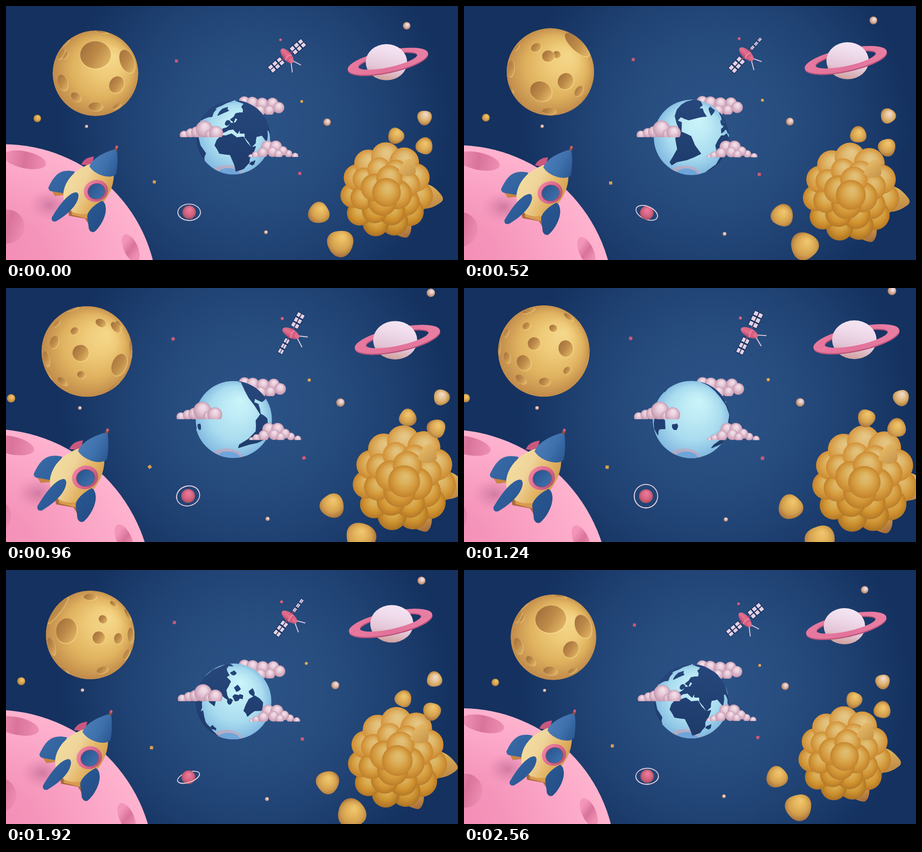
Animation, 960 px wide and 540 px high, one loop 2.6 s. Source, as an HTML page with a canvas:

```html
<!DOCTYPE html>
<html lang="en">
<head>
<meta charset="utf-8">
<title>Space</title>
<style>
html, body { margin: 0; width: 100%; height: 100%; overflow: hidden; background: #14315f; }
canvas { display: block; }
</style>
</head>
<body>
<canvas id="stage" width="960" height="540"></canvas>
<script>
const ctx = document.getElementById('stage').getContext('2d');
const LOOP = 2600, TAU = Math.PI * 2, RAD = Math.PI / 180;
const { sin, cos, hypot, atan2, sqrt } = Math;
let turn = 0, zoom = 0;

const mix = (a, b, k = zoom) => a + (b - a) * k;

// ---------- drawing helpers ----------
function place(x0, y0, x1, y1, s0, s1, draw) {
  ctx.save();
  ctx.translate(mix(x0, x1), mix(y0, y1));
  const s = mix(s0, s1);
  ctx.scale(s, s);
  draw();
  ctx.restore();
}
function stops(gradient, colors) {
  colors.forEach((c, i) => gradient.addColorStop(i / (colors.length - 1), c));
  return gradient;
}
const linear = (x0, y0, x1, y1, ...colors) => stops(ctx.createLinearGradient(x0, y0, x1, y1), colors);
const radial = (x, y, r, dx, dy, ...colors) =>
  stops(ctx.createRadialGradient(x + dx * r, y + dy * r, 0, x, y, r * 1.05), colors);

function ellipse(x, y, rx, ry, rot, fill) {
  ctx.beginPath();
  ctx.ellipse(x, y, rx, ry, rot, 0, TAU);
  ctx.fillStyle = fill;
  ctx.fill();
}
const ball = (x, y, r, colors, dx = 0.3, dy = -0.4) =>
  ellipse(x, y, r, r, 0, radial(x, y, r, dx, dy, ...colors));
function shape(d, fill) {
  ctx.fillStyle = fill;
  ctx.fill(new Path2D(d));
}
function line(x0, y0, x1, y1, width, color) {
  ctx.beginPath();
  ctx.moveTo(x0, y0);
  ctx.lineTo(x1, y1);
  ctx.lineWidth = width;
  ctx.strokeStyle = color;
  ctx.stroke();
}
function clipDisc() {
  ctx.beginPath();
  ctx.arc(0, 0, 1, 0, TAU);
  ctx.clip();
}

// ---------- sphere maths: x right, y up, z to the viewer ----------
function spin([x, y, z], [a, b, c], angle) {
  const co = cos(angle), si = sin(angle), k = (a * x + b * y + c * z) * (1 - co);
  return [x * co + (b * z - c * y) * si + a * k,
          y * co + (c * x - a * z) * si + b * k,
          z * co + (a * y - b * x) * si + c * k];
}

// ---------- yellow moon ----------
const MOON_AXIS = [-0.084, 0.958, 0.28];
// Craters as x, y, radius on the disc, seen at the given turn.
const facing = (at, ...spots) => spots.map(([x, y, r]) =>
  ({ r, at: spin([x, y, sqrt(1 - x * x - y * y)], MOON_AXIS, -at * TAU) }));
const craters = [
  facing(0, [0, .46, .36], [.5, -.27, .2], [-.71, .42, .09], [-.78, -.22, .19], [-.46, -.56, .13],
    [0, -.79, .16], [.5, -.77, .11]),
  facing(.26, [-.1, .56, .12], [.24, .4, .14], [-.66, .5, .09], [-.72, 0, .18], [.14, -.43, .25],
    [-.7, -.47, .09], [.22, -.88, .16]),
  facing(.48, [-.37, .54, .09], [-.2, .16, .14], [-.82, .39, .1], [-.8, -.15, .12], [-.43, -.26, .17],
    [-.49, -.62, .13], [.03, -.67, .12]),
  facing(.74, [-.55, .1, .28], [.2, -.06, .14], [0, .86, .14], [.28, -.79, .13]),
].flat();

function moon() {
  clipDisc();
  ball(0, 0, 1, ['#f5d88c', '#efcb79', '#dfb25f', '#bd8648'], .45, -.4);
  for (const { at, r } of craters) {
    const [x, y, z] = spin(at, MOON_AXIS, turn * TAU), k = sqrt(1 - r * r);
    if (z < .02) continue;
    const cx = x * k, cy = -y * k, rot = atan2(-y, x);
    ellipse(cx + .012, cy + .012, r * z * 1.06, r * 1.06, rot, 'rgba(250,220,145,.45)');
    ellipse(cx, cy, r * z, r, rot, linear(cx - r, cy - r * .6, cx + r, cy + r * .7, '#a06c3c', '#be8b48', '#e6bd6b'));
  }
}

// ---------- earth: rough coastlines as lon, lat pairs ----------
let seed = 7;
const random = () => (seed = seed * 16807 % 2147483647) / 2147483647;

function globePoint(lonDeg, latDeg) {
  const tilt = 32 * RAD, lon = (lonDeg - 14) * RAD, lat = latDeg * RAD, front = cos(lat) * cos(lon);
  return [cos(lat) * sin(lon), sin(lat) * cos(tilt) - front * sin(tilt), sin(lat) * sin(tilt) + front * cos(tilt)];
}
// Each edge gets one jittered midpoint, so a few points give a ragged coast.
function coast(...c) {
  const points = [];
  for (let i = 0; i < c.length; i += 2) {
    const [x, y, u, v] = [0, 1, 2, 3].map(j => c[(i + j) % c.length]), bend = (random() - .5) * .24;
    points.push(globePoint(x, y), globePoint((x + u) / 2 + (v - y) * bend, (y + v) / 2 - (u - x) * bend * .4));
  }
  return points;
}
const island = (lon, lat, r) => Array.from({ length: 8 }, (_, i) => {
  const a = i * TAU / 8, q = r * (.7 + .6 * random());
  return globePoint(lon + q * cos(a) / cos(lat * RAD), lat + q * sin(a));
});
const africa = coast(-17,15, -9,32, 10,37, 20,31, 32,31, 43,12, 51,11, 40,-5, 40,-15, 32,-28, 19,-34, 9,4, -8,4);
const eurasia = coast(-9,37, -9,43, -1,46, 8,54, 20,55, 28,60, 20,64, 14,56, 5,60, 25,71, 60,69, 100,77, 185,67,
  158,52, 155,59, 137,54, 127,38, 120,38, 121,27, 107,19, 103,2, 97,17, 90,22, 78,8, 70,23, 57,26, 52,17,
  44,13, 35,30, 36,37, 27,38, 30,46, 22,38, 13,45, 3,43);
const northAmerica = coast(-166,65, -156,71, -95,70, -85,57, -78,62, -56,52, -70,42, -81,30, -97,27, -96,18,
  -88,20, -79,8, -106,22, -124,42, -140,60);
const southAmerica = coast(-78,8, -62,10, -35,-6, -48,-26, -68,-54, -74,-50, -70,-18, -81,-5);
const greenland = coast(-55,80, -20,76, -43,60, -58,72);
const australia = coast(114,-23, 130,-12, 142,-12, 153,-27, 147,-38, 131,-32, 115,-34);
const islands = [[140,-5,5], [114,1,4.5], [102,0,4], [121,-2,3], [123,12,4], [138,37,4], [172,-41,4.5],
  [47,-19,4], [-2,54,3.5]].map(i => island(...i));
const lands = [africa, eurasia, northAmerica, southAmerica, greenland, australia, ...islands];

function limbAngle(p, q) {
  const k = p[2] / (p[2] - q[2]);
  return atan2(-mix(p[1], q[1], k), mix(p[0], q[0], k));
}
// Adds the visible part of a coastline, following the limb where it is hidden.
function traceLand(points) {
  const first = points.findIndex(p => p[2] > 0), n = points.length;
  if (first < 0) return;
  let before = points[first], exit = 0;
  ctx.moveTo(before[0], -before[1]);
  for (let i = 1; i <= n; i++) {
    const p = points[(first + i) % n];
    if (p[2] > 0) {
      if (before[2] <= 0) {
        const entry = limbAngle(before, p);
        ctx.arc(0, 0, 1, exit, entry, (entry - exit + 2 * TAU) % TAU > Math.PI);
      }
      ctx.lineTo(p[0], -p[1]);
    } else if (before[2] > 0) {
      exit = limbAngle(before, p);
    }
    before = p;
  }
  ctx.closePath();
}
function earth() {
  clipDisc();
  ball(0, 0, 1, ['#cbf5fb', '#bdeaf5', '#a9dcef', '#7fb6df'], .2, -.5);
  ellipse(-.18, 1, .42, .25, 0, 'rgba(205,160,180,.6)');
  ellipse(-.14, 1.02, .32, .19, 0, '#6ea5da');
  ctx.fillStyle = ctx.strokeStyle = linear(0, -1, 0, 1, '#27477c', '#1d3a6a');
  ctx.lineWidth = .025;
  ctx.lineJoin = 'round';
  for (const land of lands) {
    ctx.beginPath();
    traceLand(land.map(p => spin(p, [0, 1, 0], turn * TAU)));
    ctx.fill();
    ctx.stroke();
  }
}

// ---------- clouds: x, y, radius above a flat base ----------
const backCloud = [[-37,-27,12], [-20,-25,13], [1,-23,13], [23,-24,12], [36,-15,12], [16,-9,11], [-4,-8,12]];
const leftCloud = [[-37,-5,9], [-23,-9,10], [-10,-11,12], [6,-17,18], [18,-6,10], [31,-9,15]];
const frontCloud = [[-47,-1,5], [-37,-4,8], [47,-2,7], [33,-7,8], [-12,-22,13], [6,-22,13], [-22,-9,11],
                    [21,-13,10], [-1,-11,11], [12,-6,9]];
function cloud(puffs) {
  ctx.beginPath();
  ctx.rect(-70, -50, 140, 50);
  ctx.clip();
  puffs.forEach(([x, y, r]) => ball(x, y, r, ['#f4e2ec', '#ecd3e0', '#d9b4c6', '#c193aa'], .1, -.5));
}

// ---------- satellite ----------
function panel(from, to, width) {
  const h = 10.5 * width, step = (to - from) / 3;
  ctx.fillStyle = '#1a3260';
  ctx.fillRect(from, -h, to - from, 2 * h);
  ctx.fillStyle = '#e4d2e4';
  for (let i = 0; i < 3; i++)
    for (const row of [-.85, .1]) ctx.fillRect(from + (i + .13) * step, row * h, step * .74, h * .75);
}
function satellite() {
  const a = turn * 2 * TAU;
  ctx.rotate(mix(-40, -64) * RAD);
  panel(13, 47, .65 + .3 * cos(a) - .2 * sin(a));
  panel(-48, -12, .8 + .28 * sin(a + .25));
  line(-14, 0, 14, 0, 3, '#8c4265');
  line(-3, 17, -14, 34, 2, '#dcc8de');
  line(3, 17, 10, 34, 2, '#dcc8de');
  ellipse(0, 0, 9, 19, 0, linear(-9, 0, 9, 0, '#b9496c', '#e4708f', '#d65f80'));
  ellipse(0, 4, 9, 3, 0, '#f08ca6');
  ellipse(0, 6, 8.5, 3, 0, '#d65f80');
}

// ---------- ringed planets ----------
function bigRing() {
  const a = turn * 2 * TAU;
  ctx.save();
  ctx.translate(.5 + 2.5 * cos(a) - 4 * sin(a), -2);
  ctx.rotate(-12 * RAD);
  const band = (y, fill) => {
    ctx.beginPath();
    ctx.ellipse(0, y, 87, 23, 0, 0, TAU);
    ctx.ellipse(0, y - 1, 64, 14, 0, 0, TAU, true);
    ctx.fillStyle = fill;
    ctx.fill();
  };
  band(2.5, '#b9557c');
  band(0, linear(-87, 0, 87, 0, '#e9799f', '#e27299', '#ea80a5'));
  ctx.restore();
}
function ringedPlanet() {
  bigRing();
  ellipse(0, 0, 44, 38.5, 0, linear(8, -39, -8, 39, '#f5e6f5', '#eed9e9', '#e3c6d8', '#cf9f98'));
  ctx.rotate(-12 * RAD);
  ctx.beginPath();
  ctx.rect(-110, 0, 220, 60);
  ctx.clip();
  ctx.rotate(12 * RAD);
  bigRing();
}

// Ring normals of the small planet: time, x, y, z.
const ringKeys = [[0, 0,.69,.72], [320, .9,-.18,.4], [680, -.27,-.86,.42], [1240, 0,0,1], [1600, -.38,.92,.06],
                  [1920, .3,.85,.43], [2600, 0,.69,.72]];
function tumblingPlanet() {
  const t = turn * LOOP, i = ringKeys.findIndex(k => k[0] > t), a = ringKeys[i - 1], b = ringKeys[i];
  const k = (t - a[0]) / (b[0] - a[0]);
  const [x, y, z] = [1, 2, 3].map(j => mix(a[j], b[j], k));
  const flat = Math.max(.03, Math.abs(z) / hypot(x, y, z)), rot = atan2(y, x) - Math.PI / 2;
  const ring = end => {
    ctx.beginPath();
    ctx.ellipse(0, 0, 24, 24 * flat, rot, 0, end);
    ctx.lineWidth = 1.8;
    ctx.strokeStyle = '#e5cddd';
    ctx.stroke();
  };
  ring(TAU);
  ball(0, 0, 14.3, ['#ee7d9b', '#e27091', '#d1627f', '#a54c5a'], .1, -.5);
  ring(Math.PI);
}

// ---------- pink planet and rocket ----------
function pinkPlanet() {
  ball(0, 0, 327, ['#f48db5', '#f594ba', '#fba5c6', '#ffb6d0'], -.1, -.3);
  const crater = (x, y, rx, ry, deg) => ellipse(x, y, rx, ry, deg * RAD,
    linear(x - rx, y - ry * .3, x + rx, y + ry * .4, '#f395b9', '#d97399', '#ef8fb4'));
  crater(45, -294, 46, 18, 12);
  crater(270, -106, 15, 32, -24);
  crater(8, -152, 36, 36, 0);
  ctx.translate(98, -198);
  ctx.scale(1, .75);
  ball(0, 0, 46, ['rgba(170,85,130,.5)', 'rgba(190,100,145,.25)', 'rgba(230,130,170,0)'], 0, 0);
}
function rocket() {
  ctx.translate(-191, -393);
  const fin = linear(90, 350, 210, 480, '#3a6ca8', '#2c5b98', '#234c83');
  shape('M96 392L122 392L122 402L104 404Z', '#c88344');
  shape('M146 352C116 345 103 358 90 386Q90 393 98 394L128 399Z', fin);
  shape('M160 337Q166 322 187 320L182 340Z', '#c9587f');
  shape('M130 428L182 440L178 468L168 452L134 446Z', '#a86a3c');
  shape('M138 430L176 440L172 452L140 444Z', '#d99a4d');
  shape('M178 336C146 348 126 370 122 396C121 414 126 428 142 438C160 446 178 442 192 434C214 412 230 388 229 354Z',
    linear(130, 365, 220, 415, '#f2dc9f', '#efd49a', '#e3b566', '#cf984d'));
  line(231, 311, 236, 298, 6, '#8f4d40');
  line(234, 302, 236, 297, 4, '#d8607f');
  shape('M177 341Q186 319 226 306Q235 304 236 312Q238 338 234 357Q226 366 206 361Q186 355 177 341Z',
    linear(186, 322, 240, 352, '#4a7cb6', '#3e70ac', '#2a568f'));
  ellipse(191, 393, 26, 23, -.3, linear(168, 380, 216, 408, '#ef83a4', '#dc6a90', '#b5506f'));
  ellipse(192, 394, 19, 17, -.3, '#8f4668');
  ellipse(192, 394, 17.5, 16, -.3, linear(178, 382, 206, 406, '#2a568f', '#3d70ab'));
  shape('M148 396C132 398 112 424 97 450Q96 460 106 458C130 444 152 424 154 404Q154 396 148 396Z', fin);
  shape('M204 414C188 422 170 438 173 450L176 474Q180 483 188 480C200 470 213 448 212 430Q211 417 204 414Z', fin);
}

// ---------- lumpy asteroid and loose rocks ----------
// Rings of lumps: count, distance, radius, first angle.
const lumps = [[11, 70, 29, .15], [8, 49, 27, .5], [4, 26, 29, .3], [1, 4, 28, 1]].flatMap(([n, d, r, start]) =>
  Array.from({ length: n }, (_, i) => {
    const a = start + i * TAU / n, q = d + 3 * sin(i * 5);
    return [q * cos(a), q * sin(a), r + 2.5 * cos(i * 7)];
  }));
const sandy = y => [[41, 67, .07], [40, 62, .08], [37, 54, .09], [34, 46, .09]]
  .map(([hue, light, fall]) => `hsl(${hue} 64% ${light - y * fall}%)`);
function asteroid() {
  shape('M74 -14Q96 -20 118 8Q126 18 118 24Q98 40 74 38Z', linear(90, -20, 100, 40, '#e5b85f', '#b98543'));
  shape('M14 70L54 62Q58 90 46 99Q38 102 14 88Z', linear(30, 70, 40, 100, '#d3a050', '#a56c3a'));
  ball(0, 0, 85, sandy(0));
  lumps.forEach(([x, y, r]) => ball(x, y, r, sandy(y), .1, -.35));
  shape('M28 -40Q38 -70 56 -69Q66 -64 64 -38Q46 -24 28 -40Z', linear(34, -62, 58, -34, '#e6bc68', '#c8964b'));
}
const GOLD = ['#f0c873', '#e6b75e', '#d3a04e', '#a56f3d'];
const PALE = ['#f2e2ea', '#ead2d6', '#d2ab98', '#a87858'];
const BLUSH = ['#f0dcd2', '#e8c8a4', '#d8ac66', '#a97844'];
const ROSE = ['#ea7a95', '#d9627f', '#b04a64'];
function rock(r, colors, phase) {
  ctx.beginPath();
  for (let i = 0; i < 48; i++) {
    const a = i * TAU / 48, d = a - phase - turn * 2 * TAU, q = r * (1 + .09 * cos(d) + .06 * cos(3 * d));
    ctx.lineTo(q * cos(a), q * sin(a));
  }
  ctx.fillStyle = radial(0, 0, r * 1.1, .15, -.4, ...colors);
  ctx.fill();
}
// start x, y, end x, y, radius, growth, colours, tumble phase
const rocks = [
  [889, 236, 928, 232, 15.5, 1.1, BLUSH, 1.6],
  [829, 275, 855, 275, 17, 1.09, GOLD, 2.2],
  [888, 299, 919, 299, 18, 1.1, GOLD, -1.2],
  [666, 439, 695, 464, 22.5, 1.15, GOLD, 2.6],
  [710, 502, 756, 534, 28, 1.14, GOLD, 1.5],
];
const balls = [
  [851, 42, 909, 6, 8, PALE], [66.5, 239, 3.5, 234, 8, GOLD], [171, 256, 155, 255, 3.5, PALE],
  [682, 247, 714, 243, 8, PALE], [552, 481, 556, 492, 4, PALE], [628, 203, 646, 195, 3.2, GOLD],
  [583, 72, 587, 64, 3, ROSE],
];
const cubes = [[362, 117, 354, 107, '#c8587a'], [624, 356, 634, 362, '#d0587a'], [315, 374, 304, 381, '#d6a052']];

// ---------- scene ----------
function draw() {
  ctx.fillStyle = stops(ctx.createRadialGradient(530, 250, 0, 530, 250, 420), ['#2c5387', '#284e80', '#1f4273', '#14315f']);
  ctx.fillRect(0, 0, 960, 540);

  for (const [x0, y0, x1, y1, color] of cubes)
    place(x0, y0, x1, y1, 1, 1.1, () => {
      ctx.rotate(.25 + turn * TAU);
      ctx.fillStyle = color;
      ctx.fillRect(-3.2, -3.2, 6.4, 6.4);
    });
  for (const [x0, y0, x1, y1, r, colors] of balls)
    place(x0, y0, x1, y1, r, r * 1.14, () => ball(0, 0, 1, colors));

  place(190, 143, 169.5, 134, 91, 97.3, moon);
  place(543, 231, 545, 230, 1, 1.04, () => cloud(backCloud));
  place(483, 279, 483, 279.5, 79, 82.3, earth);
  place(415, 279, 410, 279, 1, 1.065, () => cloud(leftCloud));
  place(567, 321, 571, 323.5, 1, 1.05, () => cloud(frontCloud));
  place(597, 106, 606, 95, 1, 1.04, satellite);
  place(808, 119.5, 829, 110, 1, 1.07, ringedPlanet);
  place(389, 438.5, 386.5, 442.5, 1, 1.04, tumblingPlanet);
  place(-5, 621, -40, 650, 1, 1.07, pinkPlanet);
  place(191, 393, 165, 404, 1, 1.09, rocket);
  place(806, 393, 848, 409, 1, 1.13, asteroid);
  for (const [x0, y0, x1, y1, r, grow, colors, phase] of rocks)
    place(x0, y0, x1, y1, 1, grow, () => rock(r, colors, phase));
}
function frame() {
  turn = performance.now() % LOOP / LOOP;
  const k = 1 - Math.abs(1 - 2 * turn);
  zoom = k ** 3 * (10 - 15 * k + 6 * k * k);
  draw();
  requestAnimationFrame(frame);
}
frame();
</script>
</body>
</html>
```
